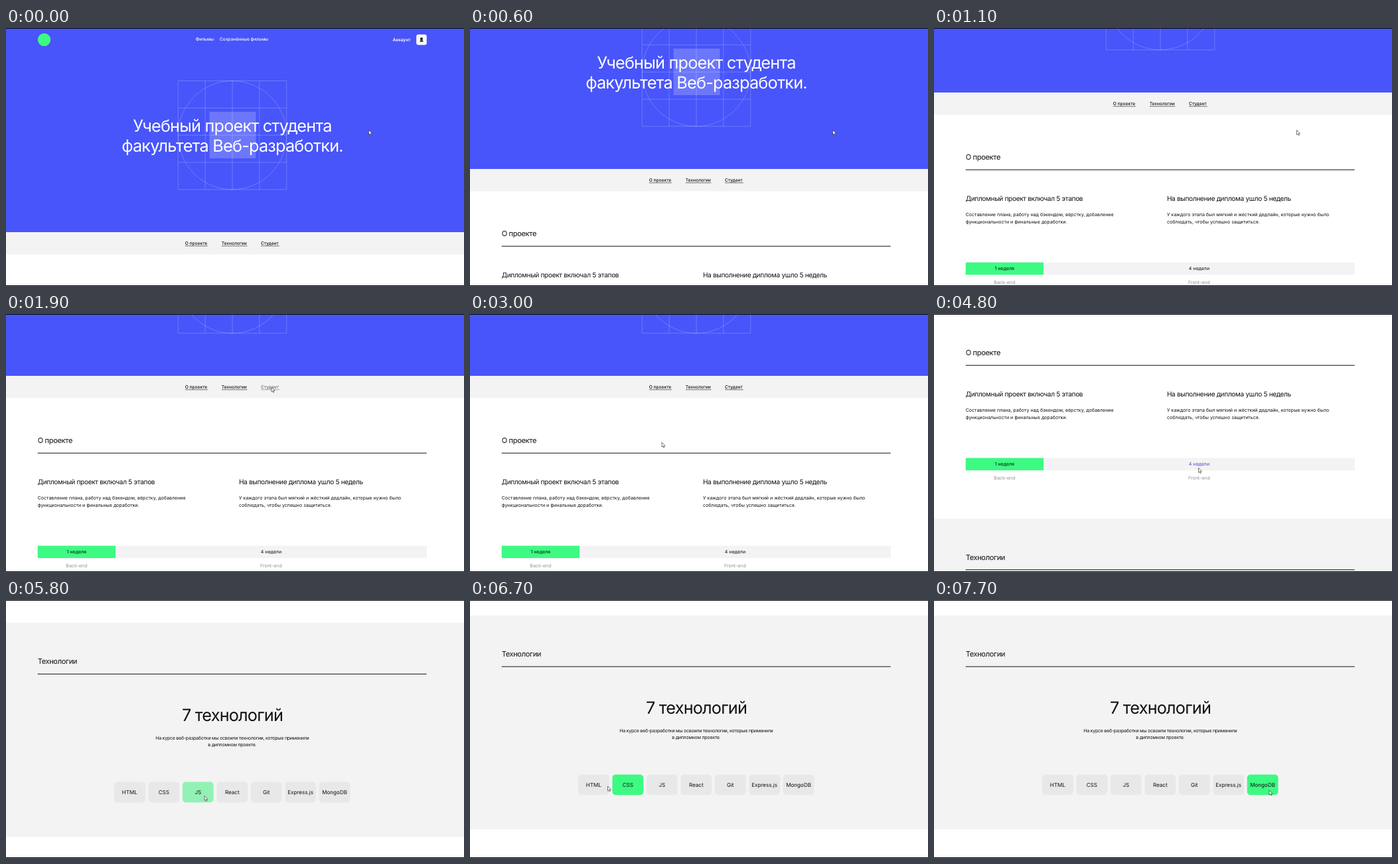
Recreate the animation shown at these times as an HTML page. Size 690 px wide and 388 px high, loop 8000 ms.

```html
<!DOCTYPE html>
<html lang="ru">
<head>
<meta charset="utf-8">
<title>Учебный проект</title>
<style>
  html, body { margin: 0; width: 100%; height: 100%; overflow: hidden; background: #fff; }
  svg { display: block; width: 100%; height: 100%; }
  text {
    font: 400 7.07px Inter, sans-serif;
    font-optical-sizing: none;
    text-rendering: geometricPrecision;
    fill: #111;
  }
  .mid { text-anchor: middle; }
  .big { font-size: 25.25px; letter-spacing: -.031em; }
  .head { font-size: 11.1px; letter-spacing: -.032em; }
  .sub { font-size: 10.1px; letter-spacing: -.032em; }
  .tight { letter-spacing: -.036em; }
  .nav { font-size: 6.6px; font-weight: 500; }
  .white { fill: #fff; }
  .grey { fill: #929292; }
  .green { fill: #3dfa82; }
  .pale { fill: #f3f3f3; }
  .grid { fill: none; stroke: #fff; stroke-opacity: .27; stroke-width: .8; }
  .rule { stroke: #111; }
  .under { stroke: #111; stroke-width: .6; }

  /* --h is the hover strength, 0 to 1 */
  .hot { --h: 0; }
  .link { opacity: calc(1 - .4 * var(--h)); }
  .week text { fill: color-mix(in srgb, #5548d0 calc(var(--h) * 100%), #111); }
  .tech rect { fill: color-mix(in srgb, #3dfa82 calc(var(--h) * 100%), #e8e8e8); }
  .tech text { font-size: 8.08px; }
</style>
</head>
<body>
<svg viewBox="0 0 690 388" preserveAspectRatio="none">
  <g id="page">
    <rect width="690" height="307" fill="#4855fa"/>
    <circle class="green" cx="57.5" cy="17.6" r="9.7"/>
    <text class="nav white" x="285.8" y="18.8">Фильмы</text>
    <text class="nav white" x="322" y="18.8">Сохранённые фильмы</text>
    <text class="nav white" x="582.4" y="19.7" style="font-weight:600">Аккаунт</text>
    <rect x="618.2" y="9.8" width="15.6" height="15.6" rx="3" fill="#f9f9f9"/>
    <circle cx="626" cy="16.2" r="1.9"/>
    <path d="M623.2 20.6q.4-2.4 2.8-2.4t2.8 2.4z"/>

    <rect x="306.5" y="126" width="70" height="70" fill="#fff" fill-opacity=".2"/>
    <path class="grid" id="grid"/>
    <circle class="grid" cx="341" cy="161.2" r="81.7"/>
    <text class="big white mid" x="341" y="156.1">Учебный проект студента</text>
    <text class="big white mid" x="341" y="185.6">факультета Веб-разработки.</text>

    <rect class="pale" y="307" width="690" height="33.5"/>
    <g class="hot link">
      <text class="nav" x="269.8" y="325.8">О проекте</text>
      <path class="under" d="M269.8 327.8H303.8"/>
    </g>
    <g class="hot link">
      <text class="nav" x="324.8" y="325.8">Технологии</text>
      <path class="under" d="M324.8 327.8H363.4"/>
    </g>
    <g class="hot link">
      <text class="nav" x="384" y="325.8">Студент</text>
      <path class="under" d="M384 327.8H411.8"/>
    </g>

    <text class="head" x="47.7" y="408.2">О проекте</text>
    <path class="rule" d="M47.7 423.2H633.7"/>
    <text class="sub" x="47.7" y="470.2">Дипломный проект включал 5 этапов</text>
    <text x="47.7" y="493.4">Составление плана, работу над бэкендом, вёрстку, добавление</text>
    <text x="47.7" y="503.6">функциональности и финальные доработки.</text>
    <text class="sub" x="350.9" y="470.2">На выполнение диплома ушло 5 недель</text>
    <text x="350.9" y="493.4">У каждого этапа был мягкий и жёсткий дедлайн, которые нужно было</text>
    <text x="350.9" y="503.6">соблюдать, чтобы успешно защититься.</text>

    <g class="hot week">
      <rect class="green" x="47.7" y="562.5" width="117.3" height="18.6"/>
      <text class="mid" x="106.3" y="574.3">1 неделя</text>
    </g>
    <g class="hot week">
      <rect class="pale" x="165" y="562.5" width="468.7" height="18.6"/>
      <text class="mid" x="399.4" y="574.3">4 недели</text>
    </g>
    <text class="mid grey" x="106.3" y="595.1">Back-end</text>
    <text class="mid grey" x="399.4" y="595.1">Front-end</text>

    <rect class="pale" y="653.7" width="690" height="321.8"/>
    <text class="head" x="47.7" y="715.7">Технологии</text>
    <path class="rule" d="M47.7 730.7H633.7"/>
    <text class="big mid" x="341" y="801.6">7 технологий</text>
    <text class="mid tight" x="340.8" y="829">На курсе веб-разработки мы освоили технологии, которые применили</text>
    <text class="mid tight" x="340.8" y="839.2">в дипломном проекте.</text>
    <g id="techs"></g>
  </g>
  <path d="M0 .5H690M0 387.5H690" stroke="#000"/>
  <path id="cursor" d="M0 0V7.1L1.7 5.6 2.8 8.1 3.9 7.6 2.8 5.2H5Z" fill="#fff" stroke="#222" stroke-width=".6"/>
</svg>
<script>
  const LOOP = 8000, STEP = 100;
  const $ = id => document.getElementById(id);

  $('grid').setAttribute('d', [0, 1, 2, 3, 4].map(i => {
    const d = i * 40.85;
    return `M${259.3 + d} 79.5v163.4M259.3 ${79.5 + d}h163.4`;
  }).join(''));

  $('techs').innerHTML = ['HTML', 'CSS', 'JS', 'React', 'Git', 'Express.js', 'MongoDB'].map((name, i) => {
    const x = 186.4 + i * 51.45;
    return `<g class="hot tech"><rect x="${x - 23.4}" y="893" width="46.8" height="30.8" rx="5"/>
      <text class="mid" x="${x}" y="911.3">${name}</text></g>`;
  }).join('');

  const hot = [...document.querySelectorAll('.hot')].map(el => ({ el, box: el.getBBox() }));

  // Eased moves from one resting value to the next: start, end, value
  const track = (from, power, moves) => t => moves.reduce((v, [a, b, to]) => {
    const u = Math.min(1, Math.max(0, (t - a) / (b - a)));
    return v + (to - v) * (1 - (1 - u) ** power);
  }, from);

  const scroll = track(0, 4, [[0, 600, 95], [700, 1400, 214], [3200, 4100, 346], [5300, 6200, 630.5]]);

  const stops = [
    [1200, 1600, 400, 110], [1900, 2600, 289, 110], [2600, 3000, 289, 193],
    [3600, 4300, 108, 228], [4300, 4800, 398.5, 231.5], [5000, 5200, 299, 294.5],
    [6400, 6700, 207.5, 280], [6800, 7600, 505, 286]
  ];
  const tipX = track(546.5, 1.5, stops);
  const tipY = track(153.5, 1.5, stops.map(([a, b, , y]) => [a, b, y]));

  function over(box, t) {
    const x = tipX(t) - box.x, y = tipY(t) + scroll(t) - box.y;
    return x >= 0 && x <= box.width && y >= 0 && y <= box.height;
  }

  function draw(t) {
    $('page').setAttribute('transform', `translate(0 ${-scroll(t)})`);
    $('cursor').setAttribute('transform', `translate(${tipX(t)} ${tipY(t)})`);
    // Hover colours trail the pointer by two steps
    for (const { el, box } of hot)
      el.style.setProperty('--h', (over(box, t - STEP) + over(box, t - 2 * STEP)) / 2);
  }

  const start = performance.now();
  function frame() {
    const t = (performance.now() - start) % LOOP;
    draw(Math.floor(t / STEP) * STEP);
    requestAnimationFrame(frame);
  }
  frame();
</script>
</body>
</html>
```
